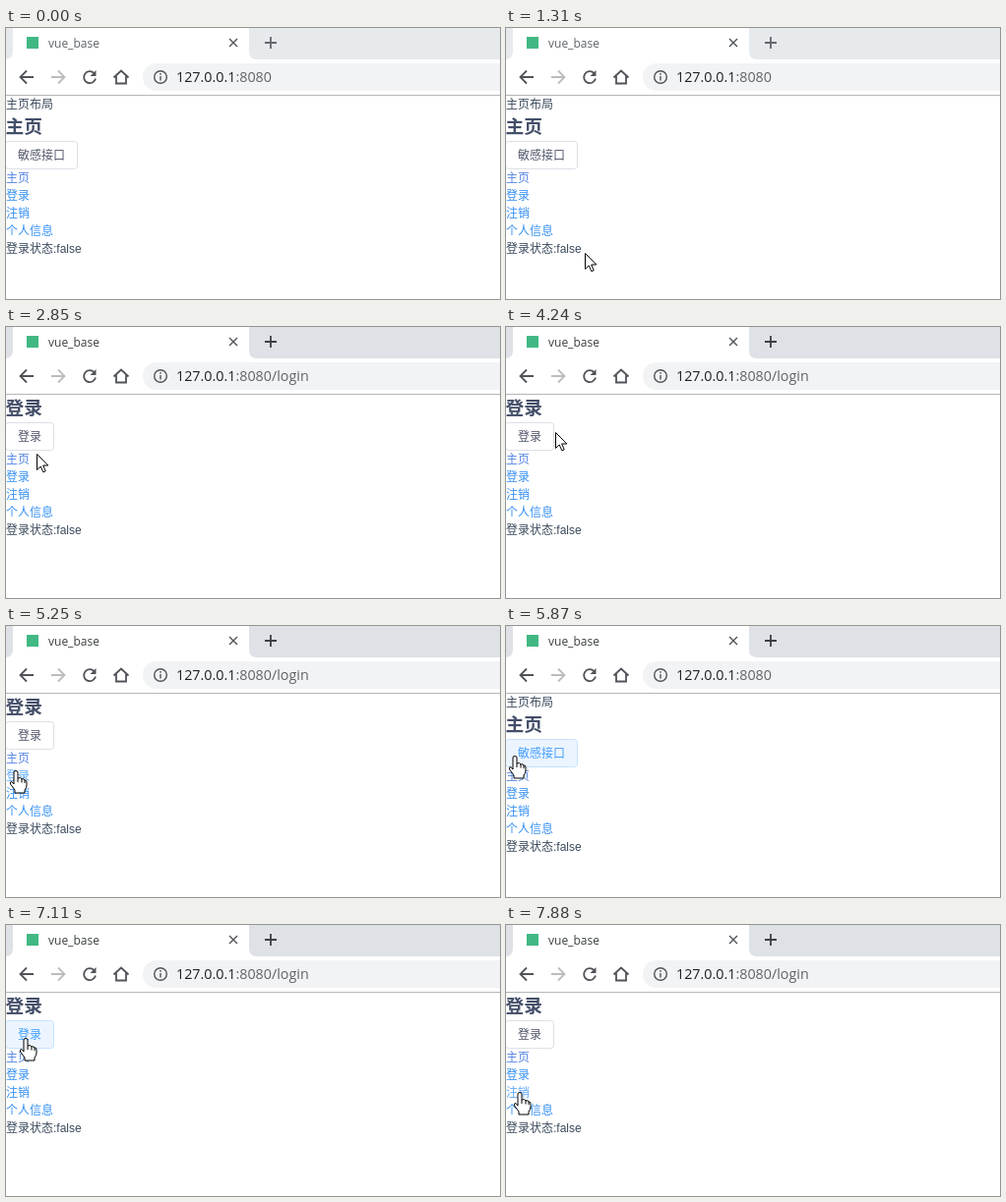
An HTML page that plays this animation: 502 by 276 pixels, repeating every 8000 ms.

```html
<!DOCTYPE html>
<html lang="zh-CN">
<head>
<meta charset="utf-8">
<title>vue_base</title>
<style>
  html, body { margin: 0; width: 502px; height: 276px; overflow: hidden; background: #fff; }
  svg { display: block; }
  text { font: 12px "Liberation Sans", "Noto Sans CJK SC", "Noto Sans CJK", sans-serif; fill: #3b4a5c; white-space: pre; }
  #tab { font: 12px "Open Sans", sans-serif; }
  #url { font: 14.3px "Open Sans", sans-serif; fill: #5f6368; }
  #head { font-size: 18.72px; font-weight: 700; fill: #434e68; }
  .link { fill: #338ff2; }
  .link.visited { fill: #5585e2; }
  .link.hover { fill: #5ba8fa; }
  #button rect { fill: #fff; stroke: #dcdfe6; }
  #button text { fill: #50566a; }
  #button.hover rect { fill: #ecf5ff; stroke: #c6e2ff; }
  #button.hover text { fill: #409eff; }
  .icon { fill: none; stroke: #505358; stroke-width: 1.8; }
  .thin { stroke-width: 1.4; }
  #click { fill: #ffff4d; mix-blend-mode: multiply; }
  #cursor { stroke: #000; stroke-linejoin: round; }
</style>
</head>
<body>
<svg width="502" height="276" viewBox="0 0 502 276">
  <rect width="502" height="276" fill="#fff"/>
  <rect id="bar" width="502" height="32"/>
  <path d="M-1 32Q7 32 7 24V0H247V24Q247 32 255 32Z" fill="#fff"/>
  <rect x="21" y="9" width="12" height="12" fill="#41b883"/>
  <text id="tab" x="43" y="20">vue_base</text>
  <path class="icon thin" d="M227 11l8 8M235 11l-8 8"/>
  <path id="plus" class="icon" d="M263 15h12M269 9v12"/>

  <path class="icon" d="M28 50H15M21 43.5L14.5 50L21 56.5"/>
  <path class="icon" style="stroke:#babcbe" d="M46 50H59M53 43.5L59.5 50L53 56.5"/>
  <path class="icon" d="M89.5 46A6 6 0 1 0 91 51.5"/>
  <path d="M91.5 43V49H85.5Z" fill="#505358"/>
  <path class="icon" d="M109.5 50.5L117 43.5L124.5 50.5M112 49V56.5H122V49"/>
  <rect x="139" y="36" width="400" height="28" rx="14" fill="#f1f3f4"/>
  <circle class="icon thin" cx="157" cy="50" r="6.3"/>
  <path class="icon thin" d="M157 46v1.7M157 49v4.5"/>
  <text id="url" x="173" y="55"><tspan fill="#202124">127.0.0.1</tspan>:8080<tspan id="path"></tspan></text>
  <rect y="68" width="502" height="1" fill="#b4b5b7"/>

  <g id="page">
    <text id="layout" y="64">主页布局</text>
    <text id="head" x="-.5" y="89"></text>
    <g id="button">
      <rect x="-.5" y="97.5" height="28" rx="3"/>
      <text x="12" y="116"></text>
    </g>
    <text class="link visited" y="139">主页</text>
    <text class="link" y="157">登录</text>
    <text class="link" y="175">注销</text>
    <text class="link" y="193">个人信息</text>
    <text y="211">登录状态:false</text>
  </g>
  <circle id="click" r="12"/>
  <path id="cursor"/>
</svg>
<script>
const $ = id => document.getElementById(id);
const links = [...document.querySelectorAll('.link')];
const LOOP = 8000, TICK = 77, ROW = 18;
const START = 1240, MOVE = 350, PRESS = 150;

const shapes = {
  arrow: 'M.5.5V16.5L4.2 13L6.8 18.8L9.2 17.8L6.7 12H11.8Z',
  hand: 'M-2 14V2Q-2 .5 0 .5T2 2V8Q5 6.5 6 9Q8.5 8 9 10Q11 9.5 11 12V15Q11 18 9 20V23H-1V20L-5.5 14Q-6.5 11.5-4 11.5L-2 14ZM2 8v4M6 9v3.5M9 10v3',
  beam: 'M-3.5-8H-1L0-7L1-8H3.5M0-7V7M-3.5 8H-1L0 7L1 8H3.5'
};

// Pointer stops; a stop may press the button and open a page
const stops = [
  { at: START, x: 80, y: 229 },
  { at: 1700, x: 14, y: 98, press: 1770, opens: 'home' },
  { at: 2390, x: 12, y: 170, press: 2390, opens: 'login' },
  { at: 2850, x: 31, y: 129 },
  { at: 3160, x: 62, y: 131 },
  { at: 3470, x: 57, y: 88 },
  { at: 3620, x: 29, y: 83 },
  { at: 4240, x: 50, y: 107 },
  { at: 4780, x: 16, y: 194 },
  { at: 5100, x: 9, y: 167 },
  { at: 5250, x: 10, y: 147 },
  { at: 5410, x: 9, y: 132, press: 5560, opens: 'home' },
  { at: 6180, x: 28, y: 205, press: 6500, opens: 'login' },
  { at: 7110, x: 20, y: 115 },
  { at: 7420, x: 16, y: 195 },
  { at: 7880, x: 14, y: 170 }
];

function pointerAt(t) {
  const i = stops.findIndex(s => s.at > t);
  if (i < 1) return i ? stops[stops.length - 1] : stops[0];
  const a = stops[i - 1], b = stops[i];
  const span = Math.min(MOVE, b.at - a.at);
  const left = Math.ceil((b.at - t) / TICK) * TICK;
  const p = Math.max(0, 1 - left / span);
  const mix = key => Math.round(a[key] + (b[key] - a[key]) * p);
  return { x: mix('x'), y: mix('y') };
}

function draw(t) {
  const pressed = stops.filter(s => s.press <= t).pop();
  const opened = stops.filter(s => s.press + PRESS <= t).pop();
  const login = opened?.opens == 'login', active = t >= 1850;
  const dy = login ? 0 : ROW, width = login ? 49 : 73;
  $('bar').setAttribute('fill', active ? '#dee1e6' : '#e7eaed');
  $('tab').style.fill = active ? '#3c4043' : '#606468';
  $('plus').style.stroke = active ? '#3c4043' : '#63676b';
  $('path').textContent = login ? '/login' : '';
  $('page').setAttribute('transform', `translate(0 ${dy})`);
  $('layout').style.display = login ? 'none' : '';
  $('head').textContent = login ? '登录' : '主页';
  const [box, label] = $('button').children;
  box.setAttribute('width', width);
  label.textContent = login ? '登录' : '敏感接口';

  const { x, y } = pointerAt(t), py = y - dy, shown = t >= START;
  const inside = (w, top, bottom) => shown && x < w && py >= top && py < bottom;
  const onButton = inside(width, 97, 126);
  $('button').classList.toggle('hover', onButton);
  let kind = onButton ? 'hand' : 'arrow';
  links.forEach((link, i) => {
    const top = 126 + i * ROW;
    const over = inside(link.textContent.length * 12, top, top + ROW);
    link.classList.toggle('hover', over);
    if (over) kind = 'hand';
  });
  if (inside(38, 72, 96) || inside(76, 198, 215)) kind = 'beam';

  const cursor = $('cursor');
  cursor.setAttribute('d', shapes[kind]);
  cursor.setAttribute('fill', kind == 'beam' ? 'none' : '#fff');
  cursor.setAttribute('transform', `translate(${x} ${y})`);
  cursor.style.display = shown ? '' : 'none';
  $('click').setAttribute('transform', `translate(${x - 1} ${y})`);
  $('click').style.display = pressed && t < pressed.press + PRESS ? '' : 'none';
}

const begin = performance.now();
function tick() {
  draw((performance.now() - begin) % LOOP);
  requestAnimationFrame(tick);
}
tick();
</script>
</body>
</html>
```
